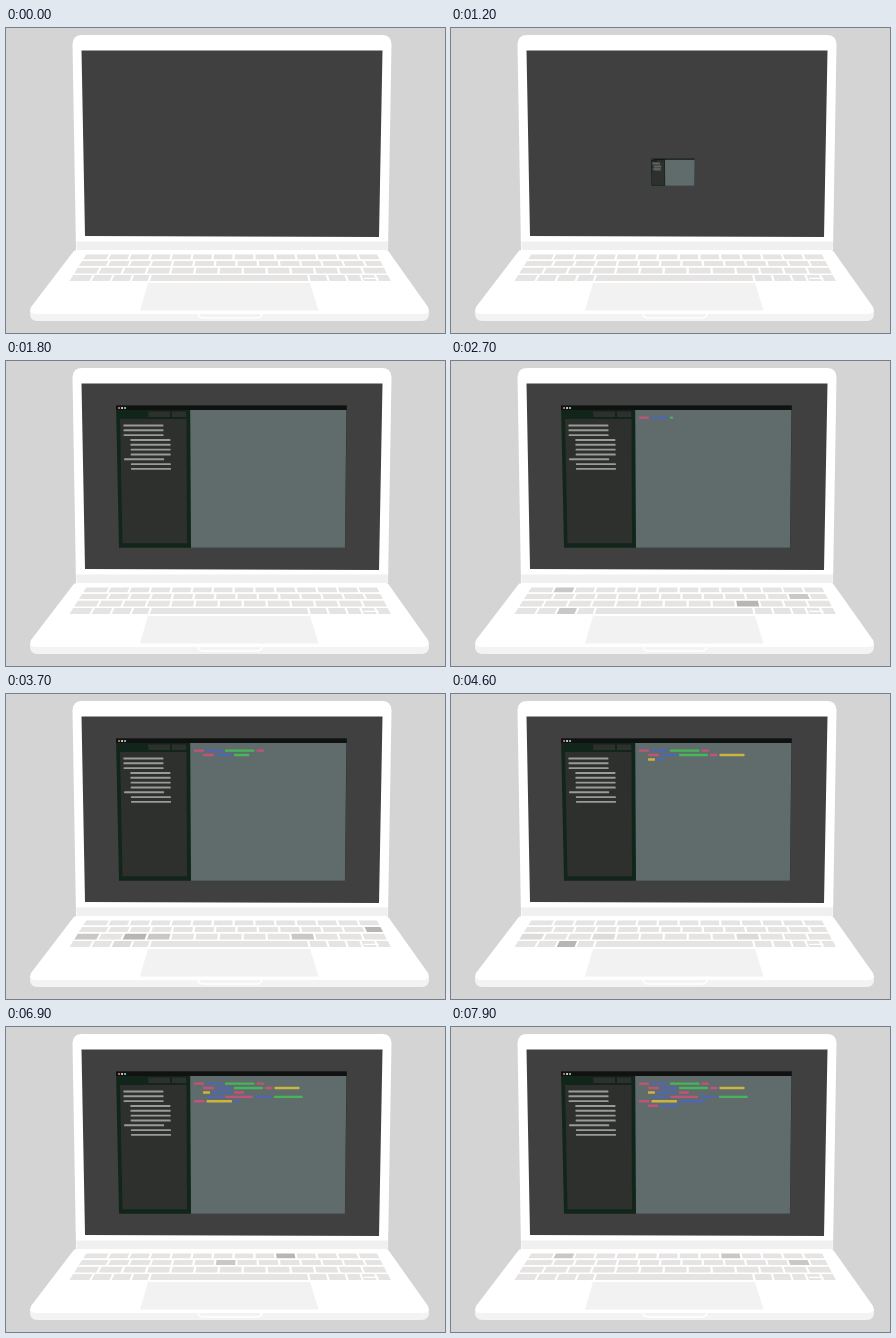
Recreate the animation shown at these times as an HTML page with a canvas. Size 439 px wide and 305 px high, loop 8000 ms.

```html
<!DOCTYPE html>
<html lang="en">
<head>
<meta charset="utf-8">
<title>Typing laptop</title>
<style>
html, body { margin: 0; width: 100%; height: 100%; overflow: hidden; background: #d4d4d4; }
canvas { display: block; }
</style>
</head>
<body>
<canvas id="stage" width="439" height="305"></canvas>
<script>
const LOOP = 8000, BEAT = 100, FLASH = 250, TYPING_START = 2200;
const c = document.getElementById('stage').getContext('2d');
const lerp = (a, b, u) => a + (b - a) * u;

function poly(color, ...p) {
  c.fillStyle = color;
  c.beginPath();
  for (let i = 0; i < p.length; i += 2) c.lineTo(p[i], p[i + 1]);
  c.closePath();
  c.fill();
}

function box(color, x, y, w, h, r = 0) {
  c.fillStyle = color;
  c.beginPath();
  c.roundRect(x, y, w, h, r);
  c.fill();
}

function shape(color, d) {
  c.fillStyle = color;
  c.fill(new Path2D(d));
}

// One letter per beat: a chord of keys, '-' typing without a new key, '.' a pause
const score = '--d-ab--e-h--' + '.' + '-hdc--' + '..' + '--c-d-he-f--ab-h-e-d-c--ef---d--' + '.' + '-g-';
const chords = {
  a: ['0.1', '1.12', '3.2'], b: ['2.9'], c: ['3.2'], d: ['2.0', '2.3', '2.9'],
  e: ['1.6'], f: ['0.9'], g: ['0.1', '0.9', '1.12'], h: ['1.13', '2.2']
};

function pressed(key, t) {
  let level = 0;
  [...score].forEach((note, i) => {
    if (chords[note]?.includes(key))
      level = Math.max(level, 1 - Math.abs(t - TYPING_START - i * BEAT) / FLASH);
  });
  return level;
}

// Relative key widths; every row spans the whole trapezoid of the keyboard
const keyRows = [
  [1.2, ...Array(13).fill(1)],
  [1.35, ...Array(12).fill(1), 0.85],
  Array(13).fill(1),
  [1.1, 1, 1, 0.9, 8, 0.95, 0.95, 0.75, 0.75, 0.7]
];

function keyX(u, y) {
  const v = (y - 226) / 27;
  return lerp(lerp(80.5, 63.5, v), lerp(373, 387, v), u);
}

function drawKeys(t) {
  keyRows.forEach((widths, r) => {
    const top = 226.4 + r * 6.3 + r * r * 0.2;
    const bottom = top + 4.8 + r * 0.4;
    const total = widths.reduce((a, b) => a + b);
    let sum = 0;
    widths.forEach((w, i) => {
      const a = sum / total, b = (sum += w) / total;
      const v = 230 - 46 * pressed(r + '.' + i, t);
      poly(`rgb(${v},${v - 2},${v - 3})`, keyX(a, top), top, keyX(b, top) - 2.2, top,
        keyX(b, bottom) - 2.2, bottom, keyX(a, bottom), bottom);
    });
  });
  box('#fff', 358, 249.8, 14.5, 1.2);
}

function drawLaptop(t) {
  box('#d4d4d4', 0, 0, 439, 305);
  shape('#fff', 'M76 7H376Q385 7 385.5 16L382 222H70L66.5 16Q67 7 76 7Z');
  poly('#404040', 75.5, 22.4, 376.5, 22.5, 373, 209, 79, 208);
  shape('#f0f0f0', 'M70 213.5H382L381.5 222H71Z');
  shape('#f3f3f3', 'M24 282H423V287Q422 293 415 293H32Q25 293 24 287Z');
  shape('#fff', 'M71 222H380Q382 222 383 224L422 279Q425 286 417 286H30Q22 286 25 279L67 224Q68 222 71 222Z');
  poly('#f2f2f2', 142, 255, 304, 255, 312.5, 282.5, 134, 282.5);
  c.strokeStyle = '#fff';
  c.lineWidth = 1.5;
  c.stroke(new Path2D('M192 285Q192 290 198 290H250Q256 290 256 285'));
  drawKeys(t);
}

// Code lines: indent, then colour letter and width of each word
const colors = { r: '#c1537a', b: '#5067b0', g: '#48b559', y: '#cbb442' };
const words = [
  '0 r10 b17 g29.5 r7.5',
  '9 r11 b16 g29 r7.5 y25',
  '9 y7 b20 r10',
  '13.5 b16 r27.5 b17 g28.5',
  '0 r10.5 y25.5 b26',
  '9 r10 b18'
].flatMap((line, row) => {
  const [indent, ...parts] = line.split(' ');
  let x = 188 + +indent;
  return parts.map(s => {
    const word = { x, y: 55.4 + row * 4.42, w: +s.slice(1), color: colors[s[0]] };
    x += word.w + 2;
    return word;
  });
});

// Beats typed so far and the length of code they give
const pace = [[0, 0], [6, 30], [22, 165.5], [33, 233], [45, 319.5], [54, 368.5]];

function typedAt(t) {
  const played = Math.max(0, Math.floor((t - TYPING_START) / BEAT) + 1);
  const beats = score.slice(0, played).replaceAll('.', '').length;
  const i = Math.max(1, pace.findIndex(p => p[0] >= beats));
  const [n0, a] = pace[i - 1], [n1, b] = pace[i];
  return lerp(a, b, (beats - n0) / (n1 - n0));
}

function drawCode(t) {
  let left = typedAt(t);
  for (const { x, y, w, color } of words) {
    if (left <= 0) break;
    box(color, x, y, Math.min(w, left), 2.4, 0.6);
    left -= w;
  }
}

function drawWindow(t) {
  const u = Math.min(1, (t - 1140) / 600);
  if (u <= 0) return;
  const s = 1 - (1 - u) ** 2;
  c.save();
  c.translate(221, 151);
  c.scale(s, s);
  c.translate(-221, -151);
  poly('#12251a', 110, 44.5, 340.7, 44.5, 339, 186.7, 113, 186.7);
  poly('#5f6c6b', 184.2, 49, 340.4, 49, 338.9, 186.7, 185, 186.7);
  poly('#101211', 110, 44.5, 340.7, 44.5, 340.5, 49, 110, 49);
  ['#ec7676', '#e8e8e8', '#8fd0c5'].forEach((col, i) => box(col, 112 + i * 3, 45.9, 2.1, 2.1, 1));
  poly('#2e302e', 142, 50.5, 164, 50.5, 164.2, 56, 142.5, 56);
  poly('#2e302e', 166, 50.5, 180, 50.5, 180.3, 56, 166, 56);
  poly('#2e302e', 114, 58, 180.5, 58, 181, 182.3, 116.5, 182.3);
  for (let i = 0; i < 10; i++) {
    const indent = i > 2 && i !== 7 ? 6.7 : 0;
    box('#999b99', 117.4 + indent + i * 0.1, 63.5 + i * 4.83, 40, 1.9, 0.5);
  }
  drawCode(t);
  c.restore();
}

function frame(now) {
  const t = Math.floor(now % LOOP / BEAT) * BEAT;
  drawLaptop(t);
  drawWindow(t);
  requestAnimationFrame(frame);
}
frame(0);
</script>
</body>
</html>
```
